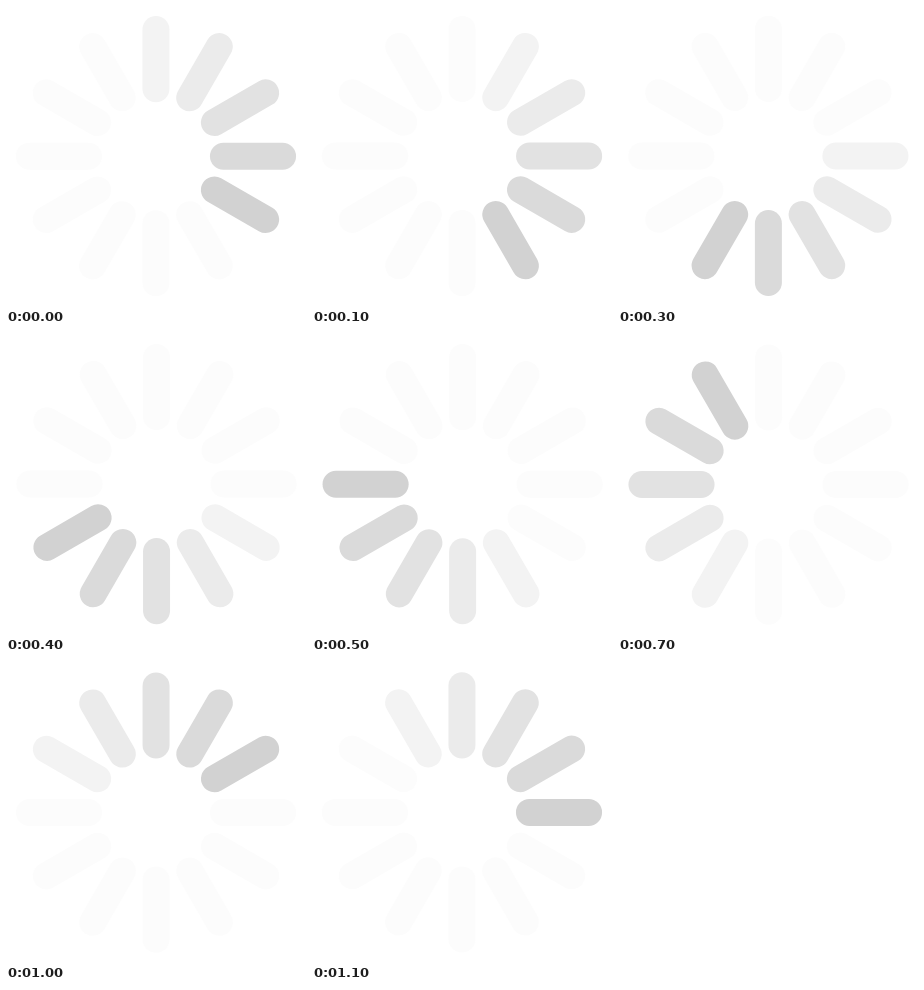
These frames come from a looping animation (300x300 px, 1.2 s). An HTML page:

```html
<!DOCTYPE html>
<html lang="en">
<head>
<meta charset="utf-8">
<title>Loading spinner</title>
<style>
  html, body { margin: 0; width: 100%; height: 100%; overflow: hidden; background: #fff; }
  svg { display: block; width: 100%; height: 100%; }
  line { stroke-width: 27; stroke-linecap: round; }
</style>
</head>
<body>
<svg viewBox="0 0 300 300"><g id="wheel"></g></svg>
<script>
  const BARS = 12, STEP = 100, CENTER = 150.3;
  const TAIL = ['#d2d2d2', '#dadada', '#e2e2e2', '#ebebeb', '#f3f3f3'];
  const wheel = document.getElementById('wheel');

  // The bars sit slightly off the pivot, so the wheel wobbles as it turns.
  for (let i = 0; i < BARS; i++) {
    const bar = document.createElementNS('http://www.w3.org/2000/svg', 'line');
    bar.setAttribute('x1', 67.5);
    bar.setAttribute('x2', 126.6);
    bar.setAttribute('stroke', TAIL[i] || '#fcfcfc');
    bar.setAttribute('transform', `translate(-.34 .09) rotate(${-i * 360 / BARS})`);
    wheel.append(bar);
  }

  function draw() {
    const step = Math.floor(performance.now() / STEP) % BARS;
    const angle = (step + 1) * 360 / BARS;
    wheel.setAttribute('transform', `translate(${CENTER} ${CENTER}) rotate(${angle})`);
    requestAnimationFrame(draw);
  }
  draw();
</script>
</body>
</html>
```
